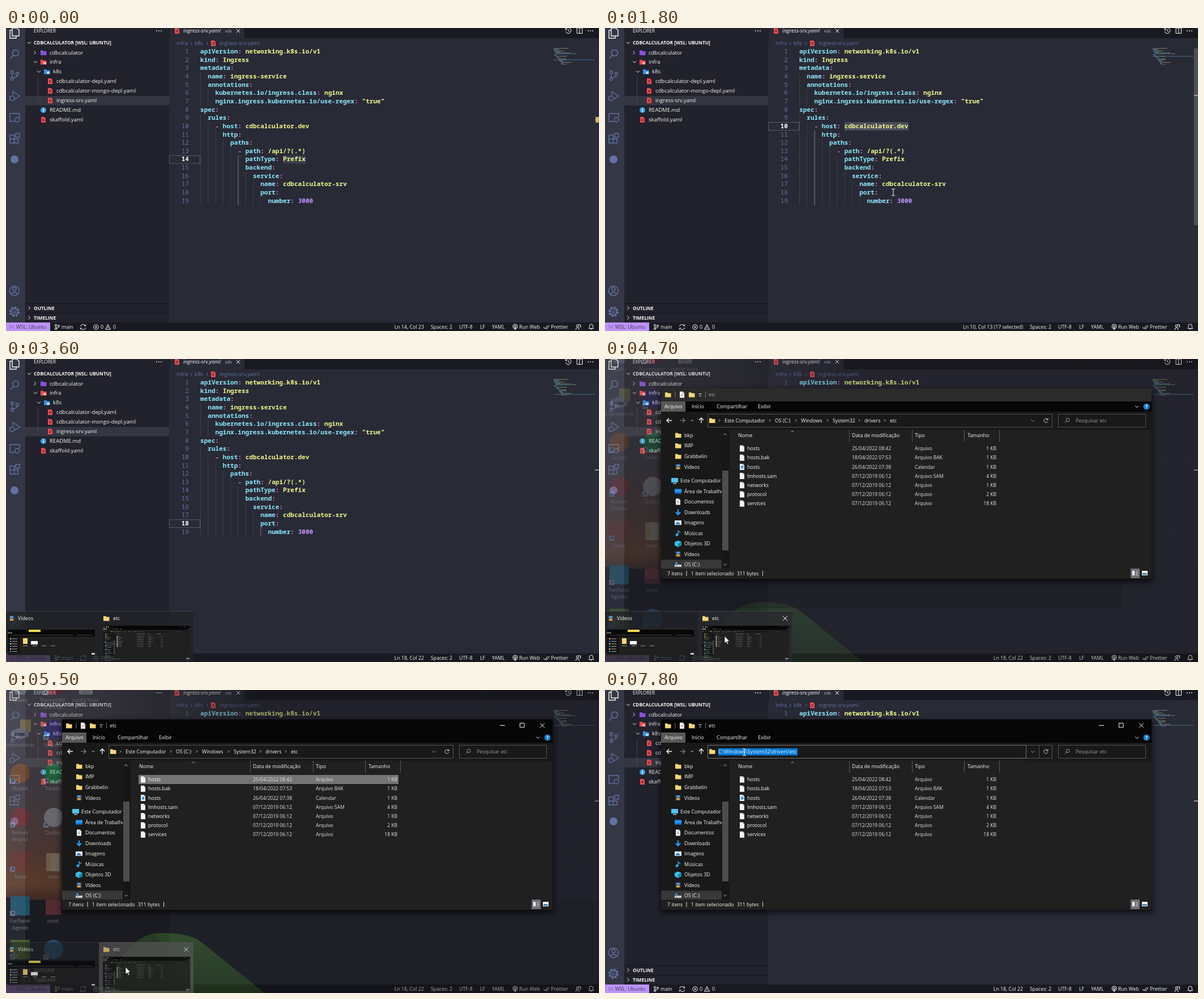
Recreate the animation shown at these times as an HTML page. Size 1047 by 535 pixels, loop 8 s.

```html
<!DOCTYPE html>
<html lang="pt">
<head>
<meta charset="utf-8">
<title>Editor and file explorer</title>
<style>
html, body { margin: 0; width: 100%; height: 100%; overflow: hidden; background: #0b0b0c; }
svg { display: block; width: 100vw; height: 100vh; font: 8.8px 'Open Sans', 'Noto Sans', sans-serif; }
.code { font: 600 11.067px 'Noto Sans Mono', 'DejaVu Sans Mono', monospace; font-variant-ligatures: none; }
.mouse, .arrow, .beam, .editor, .win, .popup, .hot, .close, .slider, .caret, .ghost, .idle, .row, .crumbs, .edit {
  animation: 8s step-end infinite;
}
.mouse { animation-name: mouse; }
.arrow { animation-name: arrow; }
.beam { animation-name: beam; }
.editor { animation-name: editor; }
.win { animation-name: win; }
.popup { animation-name: popup; }
.hot { animation-name: hot; }
.close { animation-name: close; }
.slider { animation-name: slider; }
.caret { animation-name: caret; }
.ghost { animation-name: ghost; }
.idle { animation-name: idle; }
.row { animation-name: row; }
.crumbs { animation-name: crumbs; }
.edit { animation-name: edit; }
.shadow { filter: blur(5px); }

@keyframes mouse {
  0%, 32.5% { transform: translate(-60px, -60px); }
  1.25% { transform: translate(150px, 500px); animation-timing-function: steps(4); }
  6.25% { transform: translate(542px, 175px); }
  10% { transform: translate(536px, 174px); animation-timing-function: steps(5); }
  16.25% { transform: translate(423px, 174px); }
  18.75% { transform: translate(423px, 174px); animation-timing-function: steps(3); }
  22.5% { transform: translate(509px, 290px); }
  26.25% { transform: translate(510px, 290px); }
  28.75% { transform: translate(510px, 290px); animation-timing-function: steps(2); }
  31.25% { transform: translate(360px, 394px); }
  52.5% { transform: translate(180px, 528px); animation-timing-function: steps(2); }
  55% { transform: translate(211px, 489px); }
  73.75% { transform: translate(211px, 489px); animation-timing-function: steps(3); }
  77.5% { transform: translate(506px, 105px); animation-timing-function: steps(2); }
  80% { transform: translate(600px, 109px); }
  81.25% { transform: translate(600px, 109px); animation-timing-function: steps(3); }
  85% { transform: translate(300px, 110px); }
  86.25% { transform: translate(300px, 110px); animation-timing-function: steps(6); }
  93.75% { transform: translate(203px, 110px); animation-timing-function: steps(3); }
  97.5%, 100% { transform: translate(246px, 110px); }
}
@keyframes arrow { 0% { opacity: 1; } 2.5% { opacity: 0; } 32.5% { opacity: 1; } 81.25%, 100% { opacity: 0; } }
@keyframes beam { 0% { opacity: 0; } 2.5% { opacity: 1; } 32.5% { opacity: 0; } 81.25%, 100% { opacity: 1; } }
@keyframes editor {
  0% { opacity: 1; } 58.75% { opacity: .8; } 60% { opacity: .4; } 61.25% { opacity: 0; }
  66.25% { opacity: 0; animation-timing-function: steps(3); } 70%, 100% { opacity: 1; }
}
@keyframes win { 0% { opacity: 0; } 58.75%, 100% { opacity: 1; } }
@keyframes popup {
  0% { opacity: 0; } 40% { opacity: 0; animation-timing-function: steps(4); } 45% { opacity: 1; }
  67.5% { opacity: 1; animation-timing-function: steps(4); } 72.5%, 100% { opacity: 0; }
}
@keyframes hot { 0% { opacity: 0; } 53.75% { opacity: .1; } 60% { opacity: .4; } 61.25%, 100% { opacity: .75; } }
@keyframes close { 0% { opacity: 0; } 53.75%, 100% { opacity: 1; } }
@keyframes slider { 0% { opacity: 0; } 1.25% { opacity: 1; } 38.75%, 100% { opacity: 0; } }
@keyframes caret { 0% { opacity: 0; } 23.75% { opacity: 1; } 30% { opacity: 0; } 35% { opacity: 1; } 41.25%, 100% { opacity: 0; } }
@keyframes ghost { 0% { opacity: 0; } 58.75% { opacity: .35; } 60% { opacity: .2; } 61.25%, 100% { opacity: 0; } }
@keyframes idle { 0% { opacity: 0; } 58.75% { opacity: 1; } 68.75%, 100% { opacity: 0; } }
@keyframes row { 0% { opacity: 0; } 68.75% { opacity: 1; } 81.25%, 100% { opacity: 0; } }
@keyframes crumbs { 0% { opacity: 0; } 76.25% { opacity: 1; } 78.75%, 100% { opacity: 0; } }
@keyframes edit { 0% { opacity: 0; } 81.25%, 100% { opacity: 1; } }
</style>
</head>
<body>
<svg id="stage" viewBox="0 0 1047 535" preserveAspectRatio="none" fill="#f8f8f2"></svg>
<script>
const SLATE = '#6272a4', WHITE = '#f8f8f2', GOLD = '#f7d673', RED = '#f4494f';

// y is the visual middle of the text
const text = (x, y, s, attrs = '') => `<text x="${x}" y="${y + 3.2}" ${attrs}>${s}</text>`;
const rect = (x, y, w, h, fill, attrs = '') => `<rect x="${x}" y="${y}" width="${w}" height="${h}" fill="${fill}" ${attrs}/>`;
const frame = (x, y, w, h, color) => rect(x + .5, y + .5, w, h, 'none', `stroke="${color}"`);
const disc = (x, y, r, fill) => `<circle cx="${x}" cy="${y}" r="${r}" fill="${fill}"/>`;
const line = (d, color = WHITE, w = 1) => `<path d="${d}" fill="none" stroke="${color}" stroke-width="${w}"/>`;
const ring = (x, y, r, color = WHITE, w = 1) => `<circle cx="${x}" cy="${y}" r="${r}" fill="none" stroke="${color}" stroke-width="${w}"/>`;
const right = (x, y, s = 3, c = WHITE) => line(`M${x - s / 2} ${y - s}l${s} ${s}l${-s} ${s}`, c);
const down = (x, y, s = 3, c = WHITE) => line(`M${x - s} ${y - s / 2}l${s} ${s}l${s} ${-s}`, c);
const up = (x, y, s = 3, c = WHITE) => line(`M${x - s} ${y + s / 2}l${s} ${-s}l${s} ${s}`, c);
const cross = (x, y, s, c = WHITE) => line(`M${x - s} ${y - s}l${2 * s} ${2 * s}m0 ${-2 * s}l${-2 * s} ${2 * s}`, c);
const folder = (x, y, c = GOLD) => `<path d="M${x - 5} ${y - 4}h4l1.5 1.5h5v7h-10.5z" fill="${c}"/>`;
const yaml = (x, y) => `<path d="M${x - 4} ${y - 5}h5.5l2.5 2.5v7.5h-8z" fill="${RED}"/>` + line(`M${x - 2} ${y - 1}h4m-4 2.5h4`, '#21222c');
const page = (x, y) => `<path d="M${x - 4} ${y - 5.5}h5.5l2.5 2.5v8.5h-8z" fill="#f4f4f4"/>` + line(`M${x + 1.5} ${y - 5.5}v2.5h2.5`, '#aaa', .7);
const film = (x, y) => rect(x - 5, y - 5, 10, 10, '#33343c') + rect(x - 3, y - 4, 6, 3.5, '#4aa3e0') + rect(x - 3, y + .5, 6, 3.5, '#d9a441');
const lens = (x, y, r, c, w) => ring(x, y, r, c, w) + line(`M${x - r * .7} ${y + r * .7}l${-r} ${r * 1.1}`, c, w);
const dots = (x, y) => [-4, 0, 4].map(d => disc(x + d, y, .9, WHITE)).join('');

const code = `apiVersion: networking.k8s.io/v1
kind: Ingress
metadata:
  name: ingress-service
  annotations:
    kubernetes.io/ingress.class: nginx
    nginx.ingress.kubernetes.io/use-regex: "true"
spec:
  rules:
    - host: cdbcalculator.dev
      http:
        paths:
          - path: /api/?(.*)
            pathType: Prefix
            backend:
              service:
                name: cdbcalculator-srv
                port:
                  number: 3000`.split('\n');
const CHAR = 6.64, LEFT = 343, PITCH = 14.63;
const colX = n => LEFT + n * CHAR;
const lineY = n => 42 + (n - 1) * PITCH;
const miniY = n => 34 + 1.55 * n;

function tokens(src) {
  const [, pad, dash = '', key, value = ''] = src.match(/^( *)(- )?(.+?):(?: (.*))?$/);
  let at = pad.length;
  const out = [];
  const add = (s, color, skip = 0) => { if (s) out.push({ at, s, color }); at += s.length + skip; };
  add(dash.trim(), '#ff79c6', dash ? 1 : 0);
  add(key, '#8be9fd');
  add(':', '#ff79c6', 1);
  add(value, /^\d+$/.test(value) ? '#bd93f9' : '#f1fa8c');
  return out;
}

function codeArea() {
  let out = '', mini = '';
  code.forEach((src, i) => {
    const y = lineY(i + 1), depth = src.search(/\S/) / 2;
    for (let k = 0; k < depth; k++) out += rect(colX(2 * k), y - 7.3, 1, PITCH, '#3d3f4b');
    out += text(323, y, i + 1, `fill="${SLATE}" text-anchor="end" font-weight="400"`);
    for (const t of tokens(src)) {
      out += text(colX(t.at), y, t.s, `fill="${t.color}"`);
      mini += rect(967 + t.at * .8, miniY(i + 1), t.s.length * .8, .9, t.color, 'opacity=".5"');
    }
  });
  return `<g class="code">${out}</g>${mini}`;
}

function activityBar() {
  const c = SLATE;
  return rect(0, 0, 34, 520, '#343746') +
    line('M11 0h8l4 4v10h-12zM11 4h-4v14h11v-4', WHITE, 1.4) +
    lens(17, 44, 5.5, c, 1.5) +
    ring(11, 78, 2.5, c, 1.3) + ring(11, 90, 2.5, c, 1.3) + ring(20, 81, 2.5, c, 1.3) + line('M11 80.5v7M20 83.5q0 4-8 4', c, 1.3) +
    line('M12 118v-6l12 8l-9 6', c, 1.4) + ring(11, 124, 4, c, 1.4) + line('M5 121l3 2m-3 5l3-2', c) +
    line('M16 165h-9v-14h17v7', c, 1.4) + ring(20, 162, 4, c, 1.4) +
    line('M7 189h7.5v14h-7.5zM7 196h14.5v7h-14.5M17 186h7v7h-7z', c, 1.4) +
    disc(15, 232, 7, c) +
    ring(15, 464, 8.5, c, 1.4) + ring(15, 461, 3, c, 1.3) + line('M9.5 470q5.5-7 11 0', c, 1.3) +
    `<circle cx="15" cy="501" r="7.5" fill="none" stroke="${c}" stroke-width="3" stroke-dasharray="3.6 2.29"/>` + ring(15, 501, 5.5, c, 1.4) + ring(15, 501, 2, c, 1.2);
}

function sideBar() {
  const item = (x, y, s) => text(x, y, s, 'font-size="9.5"');
  const head = 'font-size="8.35" font-weight="700"';
  return rect(34, 0, 254, 520, '#21222c') + rect(34, 120, 254, 16.5, '#343641') +
    text(49, 5, 'EXPLORER', 'font-size="8.1"') + dots(270, 5) +
    down(41, 26) + text(49, 26, 'CDBCALCULATOR [WSL: UBUNTU]', head) +
    right(51, 43.5) + folder(66, 43.5, '#8a4fe0') + item(77, 43.5, 'cdbcalculator') +
    down(52, 60) + folder(66, 60, RED) + rect(66, 60, 5, 4, '#ffb3b5') + item(77, 60, 'infra') +
    down(58, 77) + folder(72, 77, '#3d8fe0') + rect(72, 77, 5, 4, '#b5dcff') + item(83, 77, 'k8s') +
    rect(56, 86, 1, 50, '#40424e') +
    ['cdbcalculator-depl', 'cdbcalculator-mongo-depl', 'ingress-srv'].map((s, i) => yaml(78, 94 + 17 * i) + item(89, 94 + 17 * i, s + '.yaml')).join('') +
    disc(66, 145, 5, '#3aa0e8') + rect(65.4, 144, 1.4, 4, '#fff') + rect(65.4, 141.7, 1.4, 1.4, '#fff') + item(77, 145, 'README.md') +
    yaml(66, 162) + item(77, 162, 'skaffold.yaml') +
    rect(34, 486, 254, 1, '#12131a') + right(41, 494.5) + text(49, 494.5, 'OUTLINE', head) +
    rect(34, 503, 254, 1, '#12131a') + right(41, 511.5) + text(49, 511.5, 'TIMELINE', head);
}

function statusBar() {
  return rect(0, 520, 1047, 15, '#191a21') + rect(0, 520, 78, 15, '#bd93f9') +
    line('M6 525l3 3l-3 3m8-6l-3 3l3 3', '#6a4f96') + text(18, 528, 'WSL: Ubuntu', 'fill="#3b3553"') +
    ring(88, 525, 1.6) + ring(88, 531, 1.6) + ring(93, 526, 1.6) + line('M88 527v3q5 0 5-2') + text(98, 528, 'main') +
    line('M131.5 527a4.5 4.5 0 0 1 8.5-1m1 3a4.5 4.5 0 0 1-8.5 1M138 526h2.5v-2.5M134 530h-2.5v2.5') +
    ring(159, 528, 4.2) + cross(159, 528, 1.7) + text(167, 528, '0') + line('M180 523.5l4.5 8.5h-9zM180 527v3') + text(189, 528, '0') +
    text(738, 528, '', 'id="status" text-anchor="end"') +
    text(750, 528, 'Spaces: 2') + text(800, 528, 'UTF-8') + text(837, 528, 'LF') + text(858, 528, 'YAML') +
    ring(899, 527, 4) + ring(899, 527, 1.6) + line('M899 528v5', WHITE, 1.5) + text(906, 528, 'Run Web') +
    line('M949 528l2.5 3l5-6M953 530l1.5 1.5l5-6.5') + text(962, 528, 'Prettier') +
    ring(1009, 526, 2) + line('M1006 533q0-4 3-4t3 4M1010 524h4.5v4l-2 0') +
    line('M1029 530.5h8.5l-1.2-2v-2.5a3 3 0 0 0-6.1 0v2.5zM1032 532h2.5');
}

function editor() {
  return rect(288, 0, 759, 520, '#282a36') + rect(288, 0, 759, 18, '#191a21') + rect(289, 0, 132, 18, '#282a36') +
    yaml(302, 5) + text(313, 5, 'ingress-srv.yaml', 'font-size="9.4" font-style="italic"') +
    text(387, 5, 'k8s', 'font-size="8" font-style="italic" fill="#b9bac4"') + cross(410, 5, 3.2) +
    line('M988.5 2a5 5 0 1 1-.5 4M988 0v3h3M993 2v3l2.5 1.5') + line('M1008 0h9.5v9.5h-9.5zM1012.7 0v9.5') + dots(1032, 5) +
    `<g fill="${SLATE}" font-size="9.4">` + text(301, 27, 'infra') + text(333, 27, 'k8s') + text(377, 27, 'ingress-srv.yaml') + '</g>' +
    right(327, 27, 2.5, SLATE) + right(355, 27, 2.5, SLATE) + yaml(366, 27) +
    rect(0, 0, 0, 14.6, '#4c4e5b', 'id="selection" rx="2"') + rect(489, 225, 40.5, 14.6, '#3a3d4b', 'id="word"') +
    codeArea() +
    rect(0, 0, 1, 0, '#737582', 'id="guide"') +
    '<g id="current">' + frame(288, -7.5, 54, 14, '#5b5d68') + rect(300, -6, 30, 12, '#282a36') +
    text(323, 0, '', 'id="number" class="code" text-anchor="end"') + '</g>' +
    rect(967, 0, 73, 1, '#4a6a86', 'id="miniLine"') +
    rect(1039, 36, 1, 484, '#343641') + rect(1040, 36, 7, 312, '#4d4f5a', 'class="slider"') +
    rect(1041, 157, 6, 10, '#e9a44c', 'id="match"') + rect(1040, 0, 7, 1.5, '#b8b9c0', 'id="ruler"') +
    rect(482, 284, 1.2, 14, WHITE, 'class="caret"');
}

function explorer() {
  const ink = '#fff', dim = '#9a9a9a';
  const crumbs = [[211, 'Este Computador'], [300, 'OS (C:)'], [346, 'Windows'], [402, 'System32'], [458, 'drivers'], [503, 'etc']];
  const rows = [['hosts', '25/04/2022 08:42', '', 1], ['hosts.bak', '18/04/2022 07:53', ' BAK', 1], ['hosts', '26/04/2022 07:38', 'Calendar', 1],
    ['lmhosts.sam', '07/12/2019 06:12', ' SAM', 4], ['networks', '07/12/2019 06:12', '', 1], ['protocol', '07/12/2019 06:12', '', 2], ['services', '07/12/2019 06:12', '', 18]];
  const places = ['Área de Trabalho', 'Documentos', 'Downloads', 'Imagens', 'Músicas', 'Objetos 3D', 'Vídeos', 'OS (C:)'];
  const monitor = (x, y) => rect(x - 6, y - 5, 12, 8, '#4fc3f7') + rect(x - 3, y + 4, 6, 1.3, '#ddd');
  const marks = [
    (x, y) => rect(x - 6, y - 4, 12, 8, '#2196f3') + rect(x - 6, y + 2, 12, 2, '#0b63b5'),
    (x, y) => page(x, y) + line(`M${x - 2} ${y - 1}h4m-4 2.5h4`, '#3b8ed0'),
    (x, y) => line(`M${x} ${y - 5}v8M${x - 4} ${y}l4 4l4-4`, '#2f9bf0', 2.4),
    (x, y) => rect(x - 6, y - 4, 12, 8, '#e8eef4') + `<path d="M${x - 5} ${y + 3}l4-5l6 5z" fill="#2f7fc4"/>`,
    (x, y) => disc(x - 2, y + 3, 2.4, '#35a7ee') + line(`M${x} ${y + 3}v-8q0 2 4 4`, '#35a7ee', 1.4),
    (x, y) => `<path d="M${x - 6} ${y - 3}l6-2.5l6 2.5v6l-6 3l-6-3z" fill="#35c1e8"/><path d="M${x} ${y}l6-3v6l-6 3z" fill="#1785a8"/>`,
    film,
    (x, y) => rect(x - 6, y, 12, 4, '#c8ccd0') + rect(x - 5, y - 4, 4, 3, '#2f9bf0') + rect(x - 4, y + 1.5, 2, 1, '#29a329')];
  const address = folder(189, 108.5) + down(755, 109, 2.8, dim) + line('M781.5 107a3.5 3.5 0 1 0 .2 3M782 104.5v3h-3', '#ccc');

  let out = rect(99, 52, 866, 336, '#202020') + rect(99, 52, 866, 41, '#060606') + rect(99, 93, 866, 32, '#191919') +
    text(183, 63, 'etc') + line('M872 62.5h9M907.5 58.5h7.5v7.5h-7.5z') + cross(947, 62.5, 4) +
    `<g class="idle">${rect(99, 52, 866, 23, '#2b2b2b')}${text(183, 63, 'etc', `fill="${dim}"`)}</g>` +
    folder(111, 63) + page(136, 63) + line('M134 63l1.5 2l3-4', '#d43c2a') + folder(153, 63) + line('M165.5 61.5h5') + down(168, 65, 1.8) +
    rect(123.5, 58, 1, 10, '#777') + rect(177, 58, 1, 10, '#777') +
    rect(99, 75, 43, 18, '#585858') + text(105, 84, 'Arquivo') + text(153, 84, 'Início') + text(197, 84, 'Compartilhar') + text(270, 84, 'Exibir') +
    down(939, 84) + disc(956, 84, 5.5, '#1580d8') + text(956, 84, '?', 'text-anchor="middle" font-weight="700"') +
    line('M118 108.5h-9m4-4l-4 4l4 4', ink, 1.4) + line('M132 108.5h9m-4-4l4 4l-4 4', '#858585', 1.2) + down(154, 108.5, 2) + line('M170 113v-9m-4 4l4-4l4 4', ink, 1.3) +
    frame(181, 97, 608, 23, '#535353') + frame(800, 97, 154, 23, '#535353') + lens(817, 107.5, 3, dim) + text(831, 108.5, 'Pesquisar etc', `fill="${dim}"`) +
    `<g class="crumbs">${rect(399, 98, 55, 22, '#333')}${rect(455, 98, 42, 22, '#3a3a3a')}</g>` + address;
  for (const [x, s] of crumbs) out += right(x - 9, 108.5, 2, '#ccc') + text(x, 108.5, s);
  out += `<g class="edit">${rect(182, 98, 607, 22, '#191919')}${frame(181, 97, 562, 23, '#777')}${rect(766, 98, 1, 22, '#535353')}` +
    rect(200, 103, 140, 12.5, '#0078d7') + text(200, 108.5, 'C:\\Windows\\System32\\drivers\\etc') + address + '</g>';

  out += text(235, 135, 'Nome') + text(436, 135, 'Data de modificação') + text(547, 135, 'Tipo') + text(640, 135, 'Tamanho') + up(331, 128, 2.5, '#bbb');
  for (const x of [431, 542, 634, 696]) out += rect(x, 125, 1, 21, '#5a5a5a');
  out += rect(234, 150, 459, 16, '#747474', 'class="row"');
  rows.forEach(([name, date, type, size], i) => {
    const y = 158 + 16.2 * i, kind = type === 'Calendar' ? type : 'Arquivo' + type;
    out += page(242, y) + (i === 2 ? rect(240, y - 2, 4.5, 5, '#2f9bf0') : '') + text(251, y, name) +
      `<g fill="#e4e4e4" font-size="8.5">${text(436, y, date)}${text(547, y, kind)}${text(691, y, size + ' KB', 'text-anchor="end"')}</g>`;
  });

  out += rect(99, 125, 121, 245, '#191919') + rect(99, 354.5, 107, 15.5, '#383838');
  ['bkp', 'IMP', 'Grabbelin', 'Vídeos'].forEach((s, i) => {
    const y = 134.5 + 18.6 * i;
    out += (i < 3 ? folder : film)(129, y) + text(140, y, s);
  });
  out += monitor(123, 215) + text(133, 215, 'Este Computador');
  places.forEach((s, i) => {
    const y = 233.5 + 18.5 * i;
    out += marks[i](129, y) + text(140, y, s);
  });
  return out + rect(206, 125, 14, 245, '#171717') + rect(207, 197, 11, 141, '#4d4d4d') + up(212, 133, 2.8, '#bbb') + down(212, 363, 2.8, '#bbb') +
    rect(99, 370, 866, 18, '#202020') +
    text(110, 378.5, '7 itens') + text(152, 378.5, '1 item selecionado', 'font-size="8.65"') + text(233, 378.5, '311 bytes', 'font-size="8.65"') +
    rect(143.5, 374, 1, 9, '#ddd') + rect(278, 374, 1, 9, '#ddd') +
    rect(928, 370, 16, 17, '#6f6f78') + rect(931, 374, 4, 8, '#fff') + line('M937 375.5h4m-4 3h4m-4 3h4', '#ccc') +
    rect(948, 374, 10, 8, '#f2f2f2') + rect(949, 378, 8, 3, '#4d7fa8');
}

function desktop() {
  let seed = 7;
  const rnd = () => (seed = seed * 16807 % 2147483647) / 2147483647;
  const label = (x, y, ...rows) => rows.map((s, i) => text(x, y + 12 * i, s, 'text-anchor="middle" fill="#fff"')).join('');
  const link = (x, y) => rect(x, y, 9, 9, '#f5f5f5') + line(`M${x + 2} ${y + 7}l4.5-4.5m-3.5 0h3.5v3.5`, '#1769c0', 1.3);
  const app = (x, y, color) => disc(x, y, 17, color) + link(x - 18, y + 9);
  const tile = (x, y, color) => rect(x - 17, y - 17, 34, 34, color) + link(x - 18, y + 9);
  const grad = (id, rest, ...stops) => `<linearGradient id="${id}" x2="0" ${rest}>` +
    stops.map(([at, c, a = 1]) => `<stop offset="${at}" stop-color="${c}" stop-opacity="${a}"/>`).join('') + '</linearGradient>';
  const night = '#121113';
  let out = '<defs>' +
    grad('dusk', 'y2="1"', [0, '#77717a'], [.5, '#7c6a68'], [.75, '#a2653f'], [.92, '#d6722a'], [1, '#7a3a15']) +
    grad('dark', 'x2="1"', [0, night, 0], [.2, night, .12], [1, night]).replace('x2="0" ', '') +
    grad('tent', 'y2="1"', [0, '#458f1b'], [1, '#2a5a10']) + '</defs>' +
    rect(0, 0, 1047, 535, '#0d0c0d') + rect(0, 0, 440, 372, 'url(#dusk)') + rect(0, 0, 441, 372, 'url(#dark)') + rect(440, 0, 607, 372, night) +
    '<path d="M0 366q50 8 110 2v20h-110z" fill="#0d0c0d"/>';
  for (let i = 0; i < 110; i++) out += rect(820 + rnd() * 227, rnd() * 330, 1, 1, '#5a4a38', 'opacity=".6"');
  out += '<path d="M180 535Q205 440 262 430Q320 426 345 445L456 535z" fill="url(#tent)"/><path d="M262 430Q300 470 318 535H180Q205 440 262 430z" fill="#2c6412" opacity=".7"/>';
  return out +
    `<path d="M13 0h24l-4 8h-16z" fill="#d5dade"/>` + label(25, 18, 'Lixeira') +
    disc(84, -8, 17, '#e0213f') + link(65, 0) + label(83, 18, 'Navegador', 'Orbis QZ') +
    rect(129, 0, 24, 8, '#eee') + line('M133 2.5h16m-16 3h16', '#999') + label(140, 18, 'config linux') +
    rect(25, 52, 19, 22, GOLD) + `<path d="M10 72l16-6l14 6v10l-14 5l-16-6z" fill="#c9cdd1"/>` + rect(15, 76, 18, 5, '#44484c') + label(25, 97, 'Impressoras') +
    app(84, 70, '#5a45c8') + label(84, 97, 'Vesperal') +
    app(25, 147, '#f5862a') + label(25, 174, 'Skylark') + app(84, 147, '#1ed760') + label(83, 174, 'Tunelio') +
    app(25, 225, '#e4483a') + label(25, 252, 'Norvek', 'Prisma') + app(84, 225, '#f2f0ec') + label(83, 252, 'Quillor') +
    tile(25, 303, '#d9502b') + label(25, 330, 'Tavio') +
    rect(71, 288, 24, 32, GOLD) + rect(80, 291, 14, 29, '#ffeaa8') + label(83, 330, 'mvol') +
    tile(25, 381, '#18a3c6') + label(25, 408, 'FarPanel', 'Agente') + rect(70, 370, 28, 27, '#b5403a') + label(83, 408, 'mvol') +
    tile(25, 458, '#76b900') + app(84, 458, '#2496ed');
}

function popup() {
  return rect(0, 445, 331, 90, '#222327', 'opacity=".78"') + rect(0, 445, 331, 1, '#3c3d42') +
    rect(164, 445, 167, 90, '#626262', 'class="hot"') +
    film(10, 458) + text(21, 458, 'Vídeos') + folder(177, 458) + text(189, 458, 'etc') +
    `<g class="close">${cross(318, 458, 4)}</g>` +
    rect(3, 478, 154, 45, '#202020') + rect(3, 478, 154, 12, '#080808') + rect(40, 478, 21, 4, '#f2df4e') + rect(3, 482, 8, 3, '#585858') +
    line('M9 487.5h110m6 0h28', '#555', .8) + rect(3, 490, 22, 30, '#151515') +
    [0, 1, 2, 3, 4, 5].map(i => rect(7, 493 + 4.5 * i, 2.5, 2, i % 2 ? '#3aa0e8' : GOLD) + rect(11, 493.5 + 4.5 * i, 9, 1, '#aaa')).join('') +
    rect(30, 493, 8, 10, GOLD) + rect(44, 498, 12, 6, '#fff') + [30, 47, 63, 79].map(x => rect(x, 506, 8, 1, '#999')).join('') + rect(151, 519, 6, 3, '#ccc') +
    '<use href="#window" transform="translate(171 471) scale(.178) translate(-99 -52)"/>';
}

const $ = id => document.getElementById(id);
$('stage').innerHTML = desktop() +
  `<g class="editor">${activityBar()}${sideBar()}${editor()}${statusBar()}</g>` +
  rect(44, 388, 868, 52, '#1c1c20', 'class="ghost"') +
  `<g class="win">${rect(97, 54, 870, 340, '#000', 'class="shadow" opacity=".6"')}<g id="window">${explorer()}</g></g>` +
  `<g class="popup">${popup()}</g>` +
  `<g class="mouse"><path class="arrow" d="M0 0v13l3-2.7l2 4.7l2-.9l-2-4.5h4z" fill="#fff" stroke="#000" stroke-width=".7"/>` +
  `<g class="beam">${line('M-3-6h2l1 1l1-1h2M0-5v10M-3 6h2l1-1l1 1h2')}</g></g>`;

// per caret line: column, ruler position, active guide level and its first line
const spots = { 14: [23, 162, 5, 14], 10: [30, 119, 2, 11], 18: [22, 196, 8, 19] };
const set = (id, attrs) => { for (const k in attrs) $(id).setAttribute(k, attrs[k]); };
const start = performance.now();

function draw() {
  const t = (performance.now() - start) % 8000;
  const row = t < 800 ? 14 : t < 1900 ? 10 : 18;
  const [col, ruler, level, first] = spots[row];
  const picked = row === 10 ? Math.round(3.4 * Math.min(5, Math.floor((t - 800) / 100))) : 0;
  $('status').textContent = `Ln ${row}, Col ${col - picked}` + (picked ? ` (${picked} selected)` : '');
  $('number').textContent = row;
  set('current', { transform: `translate(0 ${lineY(row)})` });
  set('guide', { x: colX(2 * level), y: lineY(first) - 7.3, height: (20 - first) * PITCH });
  set('selection', { x: colX(29 - picked), y: lineY(10) - 7.3, width: picked * CHAR });
  set('miniLine', { y: miniY(row) });
  set('ruler', { y: ruler - .7 });
  set('word', { opacity: +(row === 14) });
  set('match', { opacity: +(row === 14) });
  requestAnimationFrame(draw);
}
draw();
</script>
</body>
</html>
```
